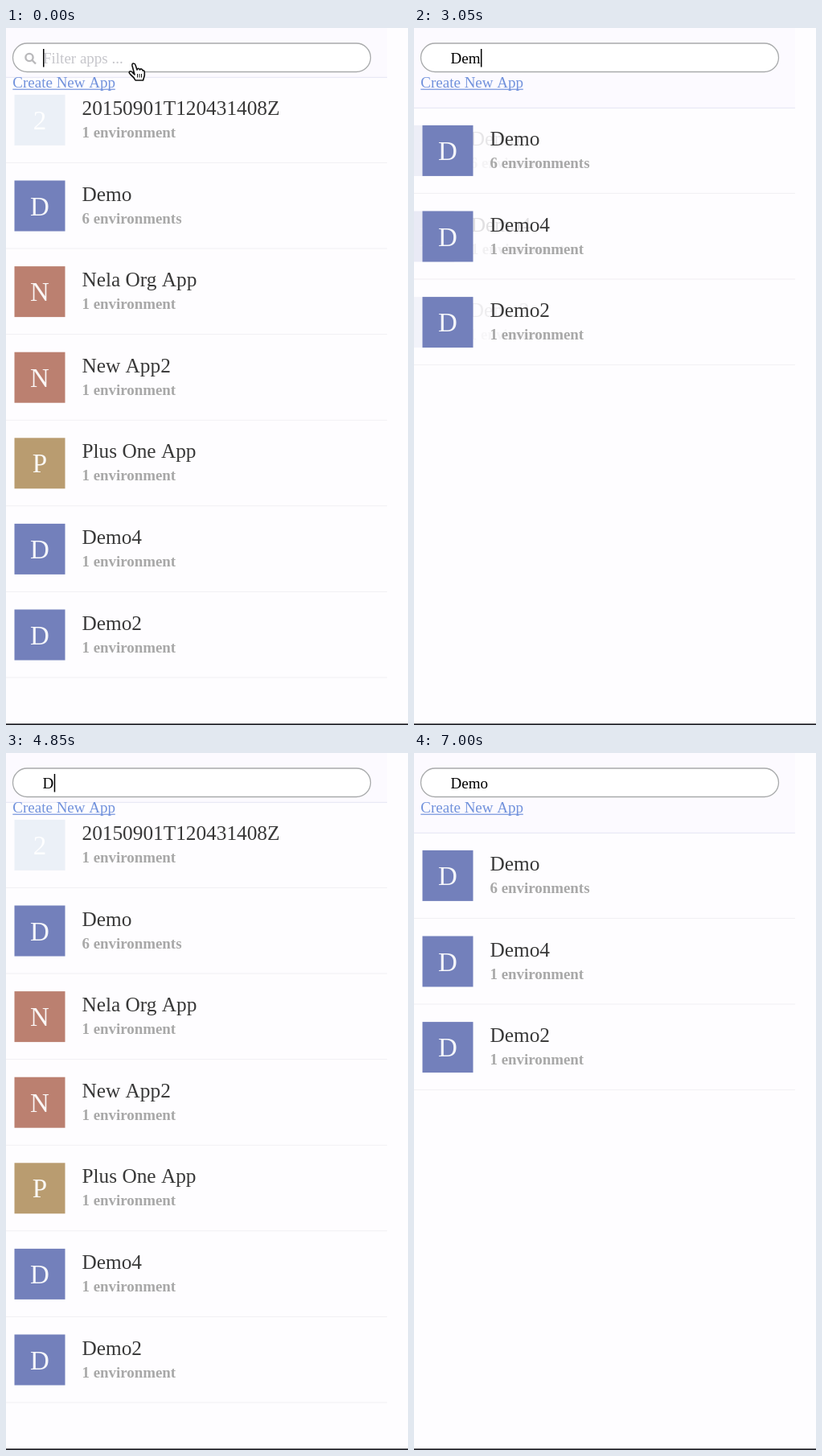
An HTML page with a canvas for the animation above (7.05 s loop, 500 px wide and 866 px high).

```html
<!DOCTYPE html>
<html lang="en">
<head>
<meta charset="utf-8">
<title>App filter</title>
<style>
  html, body { margin: 0; width: 100%; height: 100%; overflow: hidden; background: #fefdff; }
  canvas { display: block; width: 500px; height: 866px; }
</style>
</head>
<body>
<canvas id="stage" width="500" height="866"></canvas>
<script>
const LOOP = 7050, STEP = 50, ENTER = 600, SLIDE = 28, PITCH = 106.6;
const SERIF = '"Liberation Serif", "Times New Roman", serif';
const ctx = document.getElementById('stage').getContext('2d');

const TILE = { 2: '#ebf0f7', D: '#7380bb', N: '#bb8070', P: '#b99c70' };
const APPS = ['20150901T120431408Z', 'Demo', 'Nela Org App', 'New App2', 'Plus One App', 'Demo4', 'Demo2'];
const MATCHES = ['Demo', 'Demo4', 'Demo2'];

// [time, content of the search field]
const KEYS = [
  [0, ''], [700, 'D'], [1000, 'De'], [1250, 'Dem'], [1400, 'Demo'],
  [2950, 'Dem'], [3100, 'De'], [3250, 'D'], [3400, ''],
  [4750, 'D'], [5050, 'De'], [5300, 'Dem'], [5450, 'Demo']
];

// Filtered lists sliding in, newest first: start of each row
const COPIES = [
  [5990, 5970, 6010], [5390, 5390, 5790], [3190, 3170, 3210],
  [2980, 2960, 3000], [1850, 1830, 1870], [1480, 1460, 1500]
];
// Filtered lists that stay: start, end
const SETTLED = [[1290, 4450], [5200, LOOP]];

const clamp = v => Math.max(0, Math.min(1, v));
const progress = (t, start, span = ENTER) => clamp((t - start) / span);
const passed = (t, times) => times.filter(x => t >= x).length;

function text(str, x, y, size, color, weight = '') {
  ctx.font = `${weight} ${size}px ${SERIF}`;
  ctx.fillStyle = color;
  ctx.fillText(str, x, y);
}

function rect(x, y, w, h, color) {
  ctx.fillStyle = color;
  ctx.fillRect(x, y, w, h);
}

function row(name, index, shift, shown) {
  if (shown <= 0) return;
  const y = 82.9 + shift + index * PITCH;
  ctx.save();
  ctx.globalAlpha = shown;
  rect(0, y + 84, 474, 1, '#f1f0f3');
  ctx.translate(-SLIDE * (1 - shown), 0);
  rect(10.5, y, 63, 63, TILE[name[0]]);
  ctx.textAlign = 'center';
  text(name[0], 42, y + 43, 33, 'rgba(255,255,255,.93)');
  ctx.textAlign = 'left';
  text(name, 94.5, y + 25, 25.3, '#383838');
  text(name === 'Demo' ? '6 environments' : '1 environment', 94.5, y + 53, 18.9, '#a8a8a8', 'bold');
  ctx.restore();
}

// Number of rows in the unfiltered list
function rowCount(t) {
  if (t >= 2500 && t < 4900) return 3 + passed(t, [4450, 4500, 4550, 4600]);
  return 7 - passed(t - (t < 2500 ? 850 : 4900), [250, 300, 350, 450]);
}

function allShown(t, i) {
  if (t >= 2500 && t < 4900) {
    return i < 3 ? progress(t, 3750) : progress(t, 4400 + 50 * (i - 3), 250);
  }
  if (t >= 6650) return 0;
  const since = t - (t < 2500 ? 850 : 4900);
  const dip = Math.max(0, 1 - Math.abs(since - 350) / 350);
  return 1 - (i === 3 ? .36 : .4) * dip;
}

function drawLists(t, shift) {
  for (const starts of COPIES) {
    MATCHES.forEach((name, i) => {
      const p = progress(t, starts[i]);
      if (p < 1) row(name, i, shift, p);
    });
  }
  const all = () => APPS.slice(0, rowCount(t)).forEach((name, i) => row(name, i, shift, allShown(t, i)));
  const returning = t >= 2500 && t < 4450;
  if (returning) all();
  for (const [start, end] of SETTLED) {
    if (t < end) MATCHES.forEach((name, i) => row(name, i, shift, progress(t, start)));
  }
  if (!returning) all();
}

function drawHeader(t) {
  ctx.beginPath();
  ctx.roundRect(8.5, 19, 445, 35.5, 17.75);
  ctx.fillStyle = '#fff';
  ctx.fill();
  ctx.strokeStyle = '#a9abac';
  ctx.lineWidth = 1.3;
  ctx.stroke();

  const typed = KEYS.filter(k => t >= k[0]).pop()[1];
  if (typed) {
    text(typed, 45.5, 43.5, 19, '#000');
  } else {
    text('Filter apps ...', 46, 43.5, 19, '#c6c6cb');
    ctx.strokeStyle = '#b9b9bb';
    ctx.lineWidth = 2.4;
    ctx.beginPath();
    ctx.arc(29, 36.5, 4.6, 0, 7);
    ctx.moveTo(32.5, 40);
    ctx.lineTo(37, 44.5);
    ctx.stroke();
  }
  ctx.font = `19px ${SERIF}`;
  if (t < 6900) rect(46 + ctx.measureText(typed).width, 26, 1.5, 22.5, '#000');

  text('Create New App', 8.3, 74, 19, '#7292dc');
  rect(8.3, 75.6, 127.5, 1.2, '#7292dc');
}

function drawHand() {
  ctx.save();
  ctx.translate(152, 43);
  ctx.fillStyle = '#fff';
  ctx.strokeStyle = '#111';
  ctx.lineWidth = 1.6;
  ctx.lineJoin = 'round';
  const hand = new Path2D('M8 15L5 4Q4.500 1 6.500 1T9 3L11 9Q11.500 7 13 7.500T14.500 9Q15 7.500 16.500 8T18 10Q19.500 9 20.300 11.500V16L18.500 22H9Q7 18 3 15Q0 12 2 11T6 13Z');
  ctx.fill(hand);
  ctx.stroke(hand);
  ctx.lineWidth = 1;
  ctx.stroke(new Path2D('M11.500 14V18.500M14 14V18.500M16.500 14V18.500'));
  ctx.restore();
}

function draw(now) {
  const time = now % LOOP, t = time - time % STEP;
  const shift = (7 - rowCount(t)) * 9.5;
  rect(0, 0, 500, 866, '#fefdff');
  rect(0, 0, 474, 61 + shift, '#fcfaff');
  rect(0, 60.8 + shift, 474, 1, '#e4e5f3');
  drawLists(t, shift);
  drawHeader(t);
  if (t < 700) drawHand();
  rect(0, 864.3, 500, 1.7, '#1e1e24');
  requestAnimationFrame(() => draw(performance.now() - begin));
}

const begin = performance.now();
draw(0);
</script>
</body>
</html>
```
